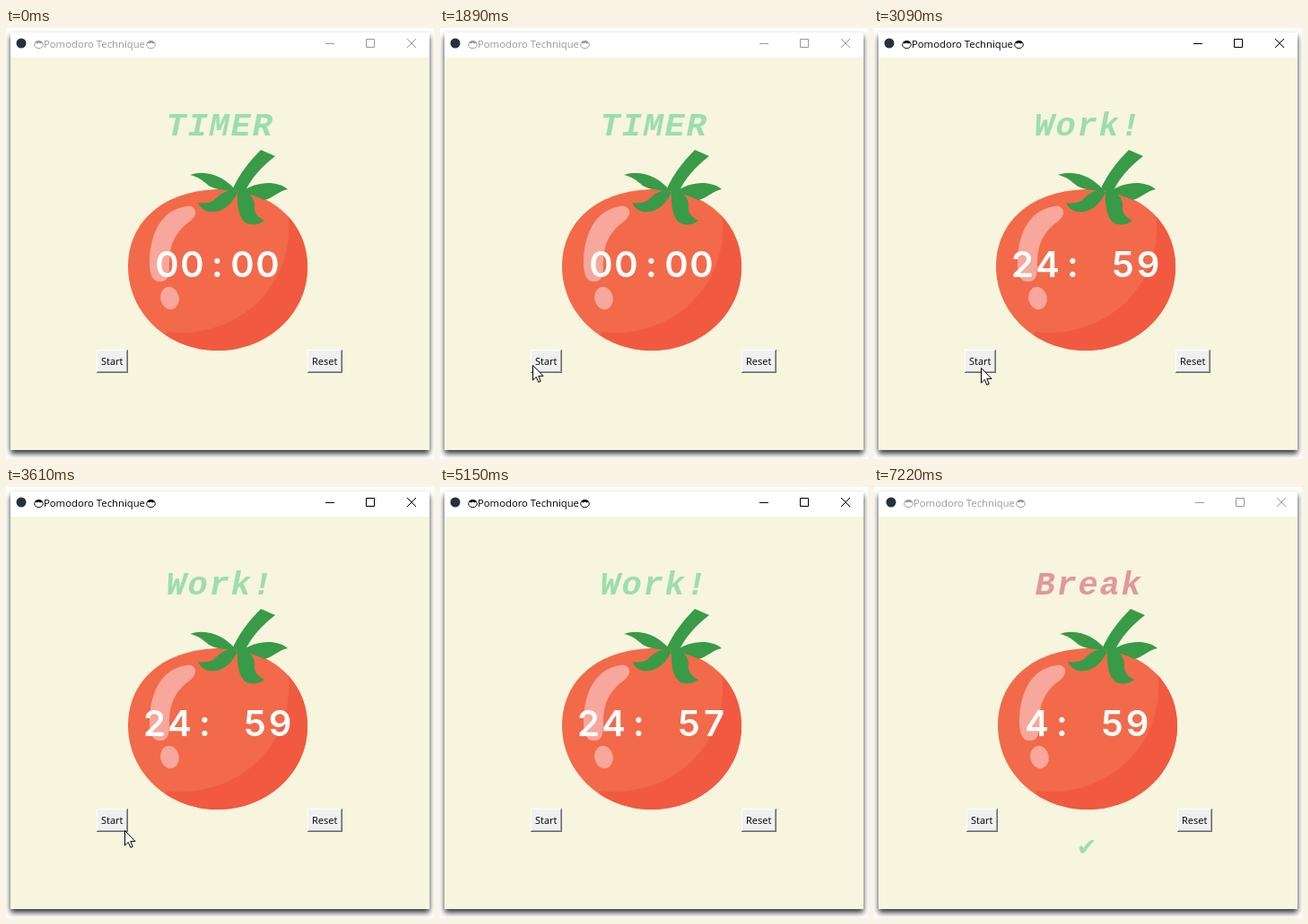
Write an HTML page that moves like this. It is 477 by 481 pixels and loops after 8000 ms.

```html
<!DOCTYPE html>
<html lang="en">
<head>
<meta charset="utf-8">
<title>Pomodoro Technique</title>
<style>
  html, body { margin: 0; width: 100%; height: 100%; overflow: hidden; background: #fff; }
  svg { display: block; width: 477px; height: 481px; }
  .window { filter: drop-shadow(0 4px 3px rgba(0, 0, 0, .8)); }
  .ui { font: 11.3px "Open Sans", "Noto Sans", sans-serif; }
  #buttons { font-size: 11px; }
  #bar { color: #999; }
  #bar.active { color: #000; }
  .line { fill: none; stroke: currentColor; }
  .glyphs { text-anchor: middle; }
  #label { font: italic bold 37px "Liberation Mono", monospace; }
  #clock { font: 600 40px Inter, sans-serif; fill: #fff; }
  #check { font: 27px "DejaVu Sans", sans-serif; fill: #9bdeac; text-anchor: middle; }
</style>
</head>
<body>
<svg viewBox="0 0 477 481">
  <defs>
    <path id="body" d="M236 360C181 360 136 319 136 266C136 216 176 180 240 180C292 180 336 214 336 267C336 319 291 360 236 360Z"/>
    <clipPath id="inside"><use href="#body"/></clipPath>
    <g id="fruit">
      <ellipse class="line" cx="36.5" cy="18.8" rx="4.8" ry="3.9"/>
      <path d="M32 16Q36.5 12 41 16L38.5 17.5 36.5 16.5 34.5 17.5Z" fill="currentColor"/>
    </g>
  </defs>

  <g class="window">
    <path d="M5 5H472V471H5Z" fill="#f7f5dd"/>
    <path d="M5 5H472V33H5Z" fill="#fff"/>
  </g>

  <g id="content">
    <g id="bar" class="ui">
      <circle cx="17" cy="17" r="5.5" fill="#22333d"/>
      <use href="#fruit"/>
      <text x="42" y="22" fill="currentColor">Pomodoro Technique</text>
      <use href="#fruit" x="125"/>
      <path class="line" d="M356 17.5H366M401.5 12.5H410.5V21.5H401.5ZM447 12L457 22M457 12L447 22"/>
    </g>

    <use href="#body" fill="#f26a49"/>
    <path clip-path="url(#inside)" fill="#f15a40" d="M314 205L350 200V370H160L180 339C255 348 325 290 314 205Z"/>
    <g fill="#f7a79b">
      <path d="M201 199C172 203 160 232 160 262C160 278 165 284 173 283C181 282 182 276 182 262C182 240 190 226 206 215C216 206 210 197 201 199Z"/>
      <ellipse cx="182.5" cy="301.5" rx="10.3" ry="12.7" transform="rotate(-10 182.5 301.5)"/>
    </g>
    <g fill="#389b47">
      <path d="M284 136L300 143C286 154 272 168 266 184L252 181C260 163 271 149 284 136Z"/>
      <path d="M205 164C225 157 245 168 255 180V182C243 181 232 180 226 176C219 170 214 166 205 164Z"/>
      <path d="M254 180C243 182 238 186 232 192C226 196 220 196 214 195C219 205 228 207 238 204C250 199 253 192 258 184Z"/>
      <path d="M258 181C257 200 260 213 268 218C276 221 283 219 288 215C278 210 276 204 277 196C276 188 270 184 265 181Z"/>
      <path d="M262 183C278 172 300 169 314 180C303 182 298 190 288 192C282 190 275 185 262 184Z"/>
    </g>

    <text id="clock" class="glyphs" y="278"></text>
    <g id="buttons" class="ui"></g>
  </g>

  <text id="label" class="glyphs" y="120"></text>
  <text id="check" x="237" y="411">✔</text>
  <path id="cursor" d="M.5 .5V17L4.3 13.4 6.8 19.3 9.2 18.3 6.8 12.4H12Z" fill="#fff" stroke="#000"/>
</svg>
<script>
const $ = id => document.getElementById(id);
const LOOP = 8000, STEP = 171.7;
const START = 12, QUIT = 41, BREAK = 42, TICK = 6;

// Pointer stops: step, x, y
const path = [
  [1, 400, 444], [2, 262, 398], [3, 169, 377], [7, 169, 377],
  [10, 110, 376], [11, 103, 376], [13, 106, 374], [15, 106, 374],
  [21, 132, 383], [22, 135, 383], [29, 360, 452]
];

function pointer(n) {
  const i = path.findIndex(p => p[0] >= n);
  if (i <= 0) return path[0].slice(1);
  const [n0, x0, y0] = path[i - 1], [n1, x1, y1] = path[i];
  const k = (n - n0) / (n1 - n0);
  return [x0 + (x1 - x0) * k, y0 + (y1 - y0) * k].map(Math.round);
}

function button(x, w, text) {
  return `<path d="M${x} 359h${w}v26h${-w}z" fill="#696969"/>
    <path d="M${x} 359h${w - 1}v25h${1 - w}z" fill="#fff"/>
    <path d="M${x + 1} 360h${w - 2}v24h${2 - w}z" fill="#a0a0a0"/>
    <path d="M${x + 1} 360h${w - 3}v23h${3 - w}z" fill="#f0f0f0"/>
    <text x="${x + 5}" y="376">${text}</text>`;
}

// Fixed-pitch line centred on cx
function spread(el, text, cx, pitch) {
  if (el.textContent === text && el.dataset.cx == cx) return;
  el.textContent = text;
  el.dataset.cx = cx;
  const left = cx - pitch * (text.length - 1) / 2;
  el.setAttribute("x", [...text].map((c, i) => left + pitch * i).join(" "));
}

function clockText(n) {
  if (n < START) return "00:00";
  const left = n < BREAK ? 25 * 60 - Math.floor((n - START) / TICK) : 5 * 60 - 1;
  return `${Math.floor(left / 60)}: ${String(left % 60).padStart(2, "0")}`;
}

function draw(now) {
  const n = Math.floor((now % LOOP + 8) / STEP);
  const rest = n >= BREAK, shift = rest ? 2 : 0;
  $("bar").classList.toggle("active", n >= START && n < QUIT);
  $("content").setAttribute("transform", `translate(${shift})`);
  spread($("clock"), clockText(n), 235.5, 28);
  spread($("label"), n < START ? "TIMER" : rest ? "Break" : "Work!", 237.5 + shift / 2, 24);
  $("label").setAttribute("fill", rest ? "#e2979c" : "#9bdeac");
  $("check").style.display = rest ? "" : "none";

  const shown = n >= 1 && n < 30;
  $("cursor").style.display = shown ? "" : "none";
  if (shown) $("cursor").setAttribute("transform", `translate(${pointer(n)})`);
  requestAnimationFrame(draw);
}

$("buttons").innerHTML = button(101, 35, "Start") + button(336, 39, "Reset");
requestAnimationFrame(draw);
</script>
</body>
</html>
```
